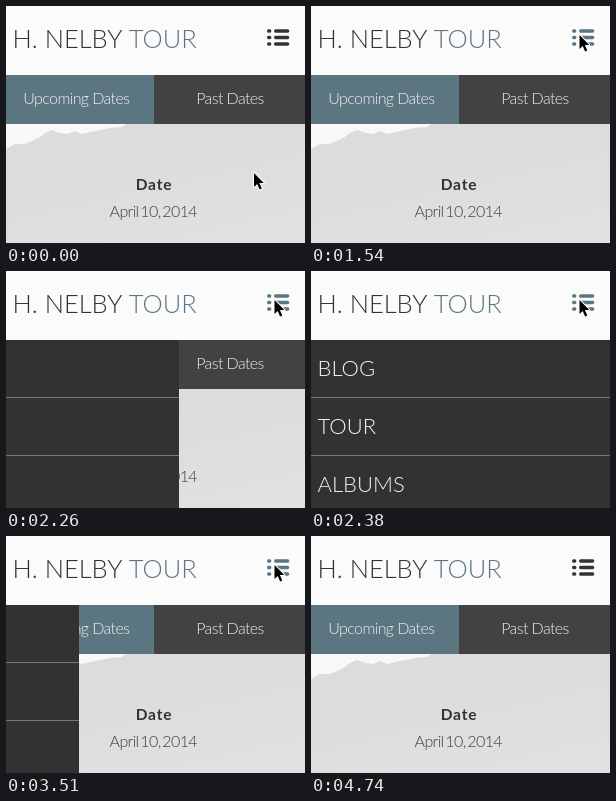
These frames come from a looping animation (299x237 px, 5470 ms). An HTML page:

```html
<!DOCTYPE html>
<html lang="en">
<head>
<meta charset="utf-8">
<title>Tour menu</title>
<style>
  html, body { margin: 0; width: 100%; height: 100%; overflow: hidden; background: #fbfbfb; }
  svg { display: block; width: 299px; height: 237px; font: 300 16px Lato, sans-serif; }
  .title { font-size: 25.5px; }
  .label { letter-spacing: -.6px; text-anchor: middle; }
  .date { word-spacing: -2px; }
  .heading { font-size: 15.5px; font-weight: 700; letter-spacing: .8px; text-anchor: middle; }
  .menu { font-size: 22px; fill: #f4f4f4; }
</style>
</head>
<body>
<svg viewBox="0 0 299 237">
  <defs>
    <linearGradient id="haze" x1=".4" y1=".3" x2=".8" y2="1">
      <stop stop-color="#dcdcdc"/>
      <stop offset="1" stop-color="#e1e1e1"/>
    </linearGradient>
  </defs>

  <rect width="299" height="69" fill="#fbfbfb"/>
  <text class="title" x="6.5" y="42" fill="#333">H. NELBY</text>
  <text class="title" x="122.8" y="42" fill="#5c7681">TOUR</text>
  <g id="icon"></g>

  <rect y="118" width="299" height="119" fill="url(#haze)"/>
  <path fill="#f8f8f8" d="M0 118H120L116 121 104 122 95 124 84 126 76 128 69 125 62 128 54 127 46 124 39 127 34 131 24 136 18 138 9 138 0 143Z"/>
  <text class="heading" x="148" y="183.5" fill="#333">Date</text>
  <text class="label date" x="147.3" y="211" fill="#3c3c3c">April 10, 2014</text>

  <rect y="69" width="148" height="49" fill="#5c7681"/>
  <rect id="pastTab" x="148" y="69" width="151" height="49"/>
  <text class="label" x="70.3" y="98" fill="#f0f0f0">Upcoming Dates</text>
  <text class="label" x="224" y="98" fill="#f0f0f0">Past Dates</text>

  <g id="menu" class="menu">
    <rect y="69" width="299" height="168" fill="#323232"/>
    <path d="M0 126.5H299M0 184.5H299" stroke="#777"/>
    <text x="6.5" y="105">BLOG</text>
    <text x="6.5" y="163">TOUR</text>
    <text x="6.5" y="221">ALBUMS</text>
  </g>

  <path id="cursor" d="M0 0V14L3.2 11 5.6 16.5 7.8 15.5 5.4 10H9.8Z"
        fill="#000" stroke="#fff" stroke-width="2" stroke-linejoin="round" paint-order="stroke"/>
</svg>
<script>
  const LOOP = 5470, WIDTH = 299, TEAL = '#5c7681';
  const [icon, pastTab, menu, cursor] =
    ['icon', 'pastTab', 'menu', 'cursor'].map(id => document.getElementById(id));

  icon.innerHTML = [23.3, 29.8, 36.3].map(y =>
    `<rect x="261" y="${y}" width="4.4" height="3.4" rx="1.6"/>
     <rect x="268" y="${y}" width="15.3" height="3.4" rx="1.6"/>`).join('');

  const clamp = p => Math.max(0, Math.min(1, p));
  const swing = p => .5 - Math.cos(Math.PI * clamp(p)) / 2;
  const mix = (a, b, p) => a + (b - a) * p;
  // Steps taken so far; the first one happens at the start time.
  const stepsSince = (t, start, step) => Math.floor((t - start) / step) + 1;

  function menuEdge(t) {
    if (t < 2200) return 0;
    const start = t < 3390 ? 2200 : 3390;
    const held = start + 60 * Math.floor((t - start) / 60);
    return WIDTH * (t < 3390 ? swing((held - 2150) / 200) : 1 - swing((held - 3375.5) / 200));
  }

  function cursorTip(t) {
    if (t < 4280) {
      const p = swing(stepsSince(t, 900, 57.5) / 10);
      const nudge = clamp(stepsSince(t, 1480, 60) / 2);
      return [mix(248, 267.5, p) + nudge, mix(167, 30, p) - nudge];
    }
    const p = swing(stepsSince(t, 4280, 57.5) / 9);
    return [mix(268.5, 278, p), mix(29, 241, p)];
  }

  function draw(now) {
    const t = now % LOOP;
    const [x, y] = cursorTip(t);
    cursor.setAttribute('transform', `translate(${x} ${y})`);
    menu.setAttribute('transform', `translate(${Math.ceil(menuEdge(t)) - WIDTH} 0)`);
    icon.setAttribute('fill', y < 42 ? TEAL : '#333');
    pastTab.setAttribute('fill', t < 1480 && y > 69 && y < 118 ? TEAL : '#424242');
  }

  function tick() {
    draw(performance.now());
    requestAnimationFrame(tick);
  }
  tick();
</script>
</body>
</html>
```
